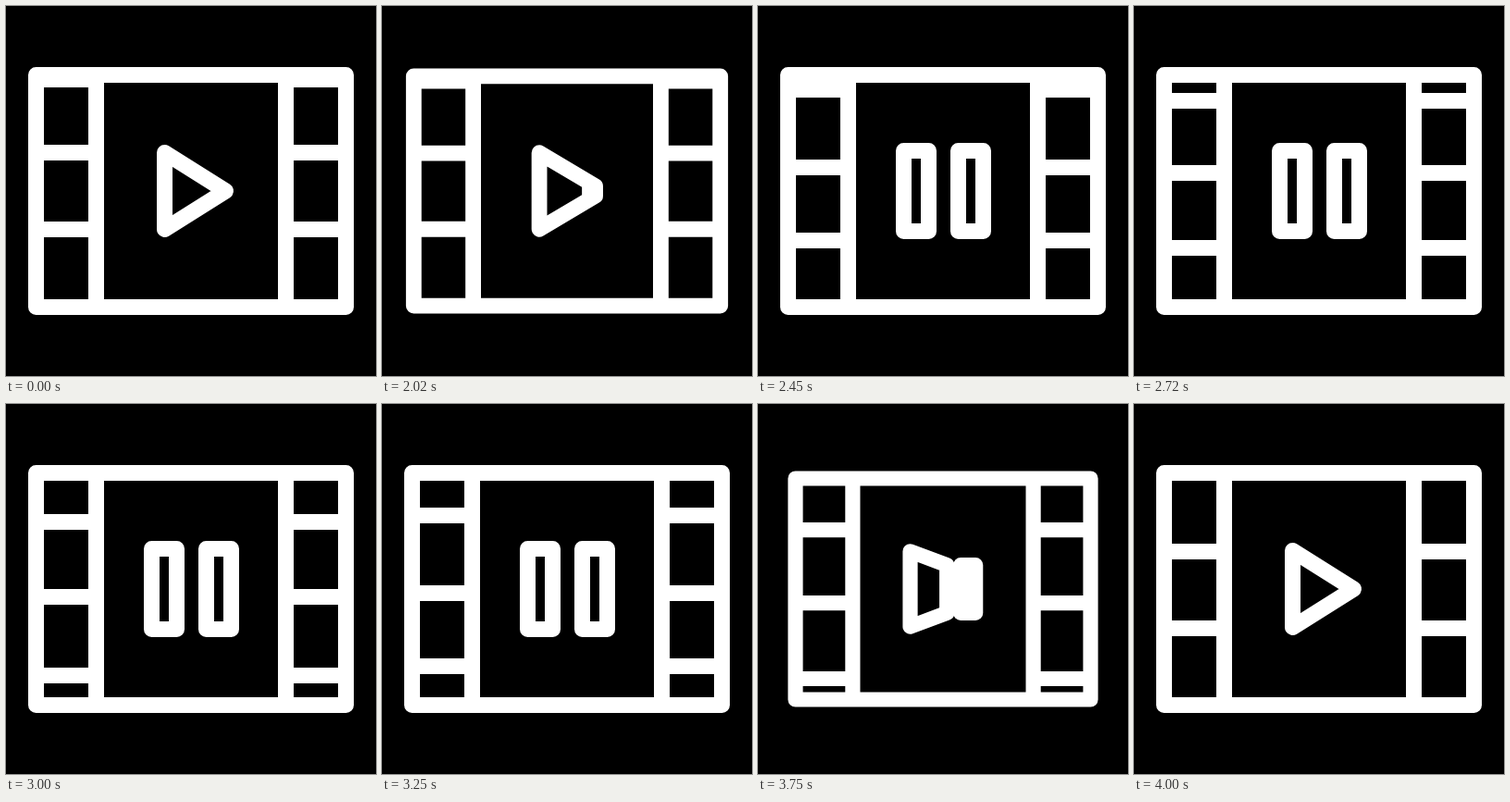
Write an HTML page that moves like this. It is 400 px wide and 400 px high and loops after 4020 ms.

```html
<!DOCTYPE html>
<html lang="en">
<head>
<meta charset="utf-8">
<title>Film strip player</title>
<style>
  html, body { margin: 0; width: 100%; height: 100%; overflow: hidden; background: #000; }
  svg { display: block; width: 100%; height: 100%; }
</style>
</head>
<body>
<svg viewBox="0 0 400 400">
  <clipPath id="window"><rect x="28" y="70" width="344" height="260"/></clipPath>
  <g id="icon" fill="none" stroke="#fff" stroke-width="17" stroke-linejoin="round">
    <path id="rungs" clip-path="url(#window)"/>
    <path d="M32.5 74.5H367.5V325.5H32.5ZM97.5 74.5V325.5M302.5 74.5V325.5"/>
    <path id="second"/>
    <path id="first"/>
  </g>
</svg>
<script>
const LOOP = 4020, START = 2000, STEP = 25;
const $ = id => document.getElementById(id);
const clamp = x => Math.min(1, Math.max(0, x));
const lerp = (a, b, p) => a + (b - a) * p;
const ramp = (t, from, to) => clamp((t - from) / (to - from));

// Strip travel: [time since start, distance, speed]
const travel = [
  [0, 0, 0], [450, 95, 0.48], [725, 266, 0.7],
  [1250, 613, 0.56], [1575, 750, 0.3], [2000, 821, 0]
];

// Rung heights at rest, from the lowest up
const rungs = [241.5, 158.5];
for (const gap of [79, 84, 81, 78, 85, 81, 79, 84, 86, 83]) {
  rungs.push(rungs[rungs.length - 1] - gap);
}

const play = [[171.5, 158.5], [237.5, 200], [237.5, 200], [171.5, 241.5]];
const bar = (left, right) => [[left, 156.5], [right, 156.5], [right, 243.5], [left, 243.5]];
const leftBar = bar(157.5, 184.5);
const rightBar = bar(216.5, 243.5);
const seed = Array(4).fill([226, 200]);

function distance(t) {
  if (t <= 0) return 0;
  const i = travel.findIndex(k => t <= k[0]);
  if (i < 0) return travel[travel.length - 1][1];
  const [t0, y0, v0] = travel[i - 1], [t1, y1, v1] = travel[i];
  const h = t1 - t0, u = (t - t0) / h, w = 1 - u;
  return w * w * ((1 + 2 * u) * y0 + u * h * v0) + u * u * ((3 - 2 * u) * y1 - w * h * v1);
}

const morph = (from, to, p) => 'M' + from.map((pt, i) =>
  pt.map((v, axis) => lerp(v, to[i][axis], p).toFixed(2)).join(' ')).join('L') + 'Z';

const dip = (t, from, to) => 0.055 * Math.sin(Math.PI * ramp(t, from, to));

function draw(ms) {
  const t = Math.floor((ms % LOOP + 5) / STEP) * STEP;
  const shift = distance(t - START);
  const paused = ramp(t, START, 2200) - ramp(t, 3675, 3875);
  const scale = 1 - dip(t, START, 2400) - dip(t, 3625, 4000);

  $('rungs').setAttribute('d', rungs.map(y => y + shift)
    .filter(y => y > 50 && y < 350)
    .map(y => `M32.5 ${y}H97.5M302.5 ${y}H367.5`).join(''));
  $('first').setAttribute('d', morph(play, leftBar, paused));
  $('second').setAttribute('d', morph(seed, rightBar, paused));
  $('second').style.display = paused > 0 ? '' : 'none';
  $('icon').setAttribute('transform',
    `translate(200 200) scale(${scale}) translate(-200 -200)`);
}

const begin = performance.now();
function tick() {
  draw(performance.now() - begin);
  requestAnimationFrame(tick);
}
tick();
</script>
</body>
</html>
```
